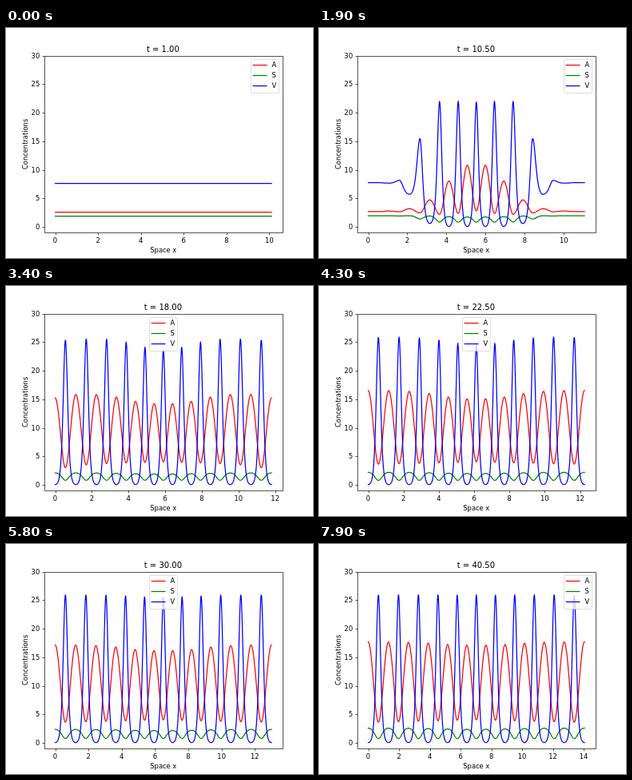
An HTML page that plays this animation: 384x288 px, repeating every 8000 ms.

```html
<!DOCTYPE html>
<html lang="en">
<head>
<meta charset="utf-8">
<title>Concentrations</title>
<style>
  html, body { margin: 0; width: 100%; height: 100%; overflow: hidden; background: #fff; }
  svg { display: block; width: 384px; height: 288px; }
  text { font: 8.33px "DejaVu Sans", sans-serif; fill: #000; }
  .title { font-size: 10px; }
  .mid { text-anchor: middle; }
  .end { text-anchor: end; }
  .axis { fill: none; stroke: #000; stroke-width: .67; }
  .curve { fill: none; stroke-width: 1.25; stroke-linejoin: round; stroke-linecap: square; }
</style>
</head>
<body>
<svg id="stage" viewBox="0 0 384 288"></svg>
<script>
const STEP_MS = 100, STEPS = 80;
const LEFT = 48, RIGHT = 345.6, TOP = 34.56, BOTTOM = 256.32;
const MID = (LEFT + RIGHT) / 2;
const HALF = (RIGHT - LEFT) / 2.2;          // half the data width, 5% margins
const UNIT = (BOTTOM - TOP) / 31;           // y runs from -1 to 30
const X0 = MID - HALF;

// Peaks 0..LAST appear one after another from the centre to the walls.
const LAST = 5, FIRST = 7.83, PACE = 4 / 3;

const sigmoid = x => 1 / (1 + Math.exp(-x));
const mix = (a, b, f) => a + (b - a) * f;
const core = j => Math.exp(-((j / 2) ** 2));           // 1 at the centre, 0 outside
const front = (age, lead) => sigmoid(2.7 * (age + lead));

// peak: value at the j-th V peak; gap: value in the valley outside it.
// age counts from the passing of the front; sharp shapes the curve between.
const SERIES = [
  {
    name: "A", color: "#f00", rest: 2.68,
    peak(j, t, age) {
      const dip = mix(this.rest, 2.15, front(age, 1.2));
      return mix(dip, 4.05 - .08 * j, sigmoid(1.1 * (age - 3.2)));
    },
    gap(j, t, age) {
      const settled = 18.5 - (6 + 4.5 * core(j)) * Math.exp(-t / 20);
      return mix(this.rest, settled, sigmoid(1.2 * (age - 1.25)));
    },
    sharp: () => 1.1
  },
  {
    name: "S", color: "#008000", rest: 1.96,
    peak(j, t, age) { return mix(this.rest, .88 - .003 * t, front(age, 1.33)); },
    gap(j, t, age) { return mix(this.rest, 1.73 + .0217 * t - .2 * core(j), front(age, 0)); },
    sharp: () => 2
  },
  {
    name: "V", color: "#00f", rest: 7.75,
    peak(j, t, age) {
      const slow = 3.4 * core(j) * Math.exp(-(((t - 8) / 16) ** 2));
      const fresh = 2.4 * Math.exp(-Math.max(age, 0) / 2.4);
      return mix(this.rest, 26 - slow - fresh, front(age, 1.33));
    },
    gap(j, t, age) { return mix(this.rest, .08, front(age, .95)); },
    sharp: rise => 2 + 1.5 * Math.max(rise, 0) / 25
  }
];

const toY = v => BOTTOM - (v + 1) * UNIT;
const snap = v => Math.floor(v + .5) + .5;

// A row of sech² humps spaced 2 apart: 1 at u = 0, 0 halfway between.
function hump(u, sharp) {
  const sum = x => [x, 2 - x, 2 + x].reduce((s, d) => s + Math.cosh(sharp * d) ** -2, 0);
  return (sum(u) - sum(1)) / (sum(0) - sum(1));
}

// Distance of the j-th peak from the centre; the inner ones relax to even spacing.
const peakPlace = (j, t) => 24.5 * j - (3.9 - .07 * t) * Math.sin(Math.PI * j / LAST);

// Nodes from the centre to the wall: peak, gap, peak, gap ...
function nodePlaces(t) {
  const places = [];
  for (let j = 0; j <= LAST; j++) {
    const here = peakPlace(j, t);
    places.push(here, j < LAST ? (here + peakPlace(j + 1, t)) / 2 : HALF);
  }
  return places;
}

function curvePath(series, t, places) {
  const values = places.map((_, n) => {
    const j = n >> 1, age = t - FIRST - PACE * j;
    return n % 2 ? series.gap(j, t, age) : series.peak(j, t, age);
  });
  const valueAt = d => {
    let n = 0;
    while (n < places.length - 2 && d > places[n + 1]) n++;
    const peak = n + n % 2, gap = n + 1 - n % 2;
    const u = Math.min(1, Math.abs((d - places[peak]) / (places[gap] - places[peak])));
    const rise = values[peak] - values[gap];
    return values[gap] + rise * hump(u, series.sharp(rise));
  };
  const points = [];
  for (let x = -HALF; x <= HALF; x += HALF / 270) {
    points.push((MID + x).toFixed(2) + " " + toY(valueAt(Math.abs(x))).toFixed(2));
  }
  return "M" + points.join("L");
}

function add(parent, tag, attrs, text) {
  const el = document.createElementNS("http://www.w3.org/2000/svg", tag);
  for (const key in attrs) el.setAttribute(key, attrs[key]);
  if (text !== undefined) el.textContent = text;
  parent.append(el);
  return el;
}

const stage = document.getElementById("stage");
add(stage, "rect", { width: 384, height: 288, fill: "#fff" });

for (let v = 0; v <= 30; v += 5) {
  const y = snap(toY(v));
  add(stage, "path", { class: "axis", d: `M45.6 ${y}H48.5` });
  add(stage, "text", { class: "end", x: 42.2, y: y + 2.7 }, v);
}
const ticks = [];
for (let value = 0; value <= 14; value += 2) {
  ticks.push({
    value,
    mark: add(stage, "path", { class: "axis" }),
    label: add(stage, "text", { class: "mid", y: 269 }, value)
  });
}

const curves = SERIES.map(s => add(stage, "path", { class: "curve", stroke: s.color }));
add(stage, "path", { class: "axis", d: `M48.5 ${snap(TOP)}H${snap(RIGHT)}V${snap(BOTTOM)}H48.5Z` });
const title = add(stage, "text", { class: "title mid", x: 196.4, y: 30 });
add(stage, "text", { class: "mid", x: MID, y: 281 }, "Space x");
add(stage, "text", { class: "mid", transform: "translate(26.5 145.4) rotate(-90)" }, "Concentrations");

const legend = add(stage, "g", {});
add(legend, "rect", { x: .5, y: 39.5, width: 35, height: 42, rx: 1.7,
  fill: "#fff", "fill-opacity": .8, stroke: "#ccc", "stroke-opacity": .8, "stroke-width": .83 });
SERIES.forEach((s, i) => {
  const y = 46.5 + i * 13;
  add(legend, "path", { class: "curve", stroke: s.color, d: `M3.2 ${y}h16.7` });
  add(legend, "text", { x: 26.4, y: y + 2.6 }, s.name);
});

// The legend jumps to the emptiest spot along the top.
function legendX(t) {
  const right = 306, centre = 179, left = 52;
  if (t < 15 || t >= 39.5) return right;
  return t < 38 ? centre : left;
}

function draw(k) {
  const t = 1 + k / 2, length = 10 + t / 10;
  title.textContent = "t = " + t.toFixed(2);
  for (const { value, mark, label } of ticks) {
    const x = X0 + value / length * 2 * HALF;
    mark.style.display = label.style.display = x <= RIGHT ? "inline" : "none";
    mark.setAttribute("d", `M${snap(x)} 256.5v2.9`);
    label.setAttribute("x", x);
  }
  const places = nodePlaces(t);
  SERIES.forEach((s, i) => {
    // The uniform starting state is drawn as crisp, pixel-aligned lines.
    const flat = `M${X0} ${snap(toY(s.rest))}H${MID + HALF}`;
    curves[i].setAttribute("d", k === 0 ? flat : curvePath(s, t, places));
  });
  legend.setAttribute("transform", `translate(${legendX(t)} 0)`);
}

let shown = -1;
function tick() {
  const k = Math.floor(performance.now() / STEP_MS) % STEPS;
  if (k !== shown) draw(shown = k);
  requestAnimationFrame(tick);
}
tick();
</script>
</body>
</html>
```
